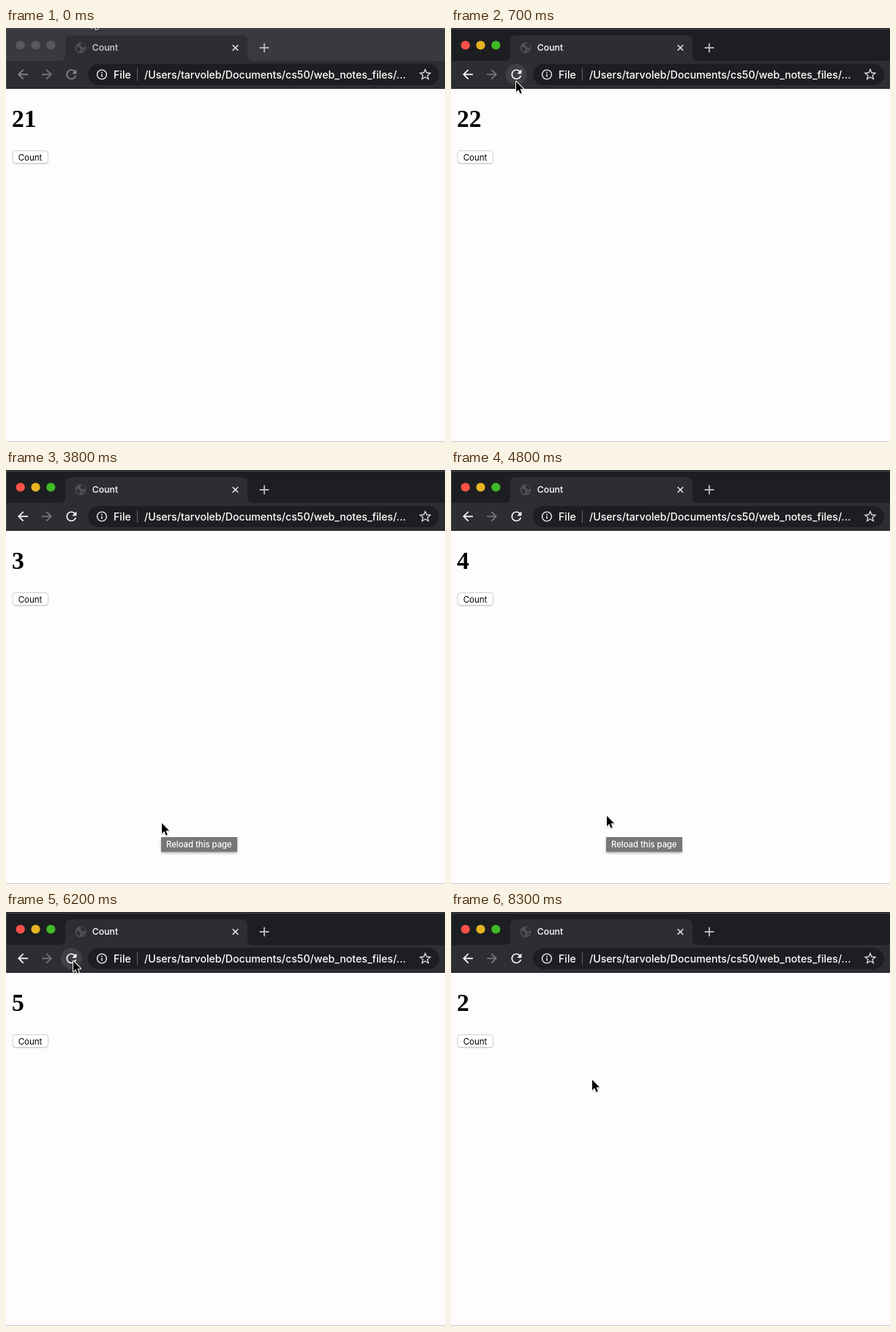
Write an HTML page that moves like this. It is 600 px wide and 565 px high and loops after 8.8 s.

```html
<!DOCTYPE html>
<html lang="en">
<head>
<meta charset="utf-8">
<title>Count</title>
<style>
  html, body { margin: 0; width: 100%; height: 100%; overflow: hidden; background: #fefcff; }
  svg { display: block; width: 600px; height: 565px; }
  text { font-family: Inter, "Open Sans", sans-serif; white-space: pre; }
  .h1 { font: bold 33.6px "Liberation Serif", "Times New Roman", serif; }
  .frame { fill: #1d1e21; }
  .toolbar { fill: #2d2e32; }
  .icon, .tab { fill: #fff; }
  .inactive .frame { fill: #393a3e; }
  .inactive .icon { fill: #898a8d; }
  .inactive .tab { fill: #d2d2d4; }
  .inactive .light { fill: #58595d; }
</style>
</head>
<body>
<svg viewBox="0 0 600 565">
  <defs>
    <path id="arrow" d="M20 11H7.83l5.59-5.59L12 4l-8 8 8 8 1.41-1.41L7.83 13H20z"/>
    <filter id="soft" x="-10%" y="-30%" width="120%" height="170%">
      <feDropShadow dx="0" dy="2" stdDeviation="1.5" flood-opacity=".3"/>
    </filter>
    <filter id="lift" x="-30%" y="-20%" width="170%" height="150%">
      <feDropShadow dx="0" dy=".8" stdDeviation=".7" flood-opacity=".35"/>
    </filter>
  </defs>

  <g id="chrome">
    <rect class="frame" width="600" height="46"/>
    <path d="M0 1.5H600" stroke="#4b4c50"/>
    <path class="toolbar" d="M0 45H73Q81 45 81 37V18Q81 10 89 10H322Q330 10 330 18V37Q330 45 338 45H600V83H0Z"/>
    <path d="M0 82.5H600" stroke="#18191b"/>
    <path d="M.5 2V83" stroke="#55565a" stroke-opacity=".7"/>
    <circle class="light" cx="19.7" cy="23.5" r="6.1" fill="#fd5148"/>
    <circle class="light" cx="40.5" cy="23.5" r="6.1" fill="#e6b423"/>
    <circle class="light" cx="61.3" cy="23.5" r="6.1" fill="#40ba27"/>

    <circle cx="102" cy="27" r="7.4" fill="#505155"/>
    <path d="M96.3 25.5l4 1.2 1.6 3-1.8 3.2q-4-2-3.8-7.4zM101.5 21l3.5-.4q3 2 3.3 5l-3 1.4-3-2.2zM104.6 29.5l2.6-.5-2.6 4z" fill="#2d2e32"/>
    <text class="tab" x="117.7" y="31.2" font-size="12.3" font-weight="500">Count</text>
    <path d="M309.7 23.2l7.6 7.6m0-7.6l-7.6 7.6" stroke="#e4e4e6" stroke-width="1.6"/>
    <path d="M346.7 27h12.6M353 20.7v12.6" stroke="#b4b5b8" stroke-width="1.9"/>

    <use href="#arrow" class="icon" transform="translate(12.6 52.9) scale(.87)"/>
    <use href="#arrow" fill="#77787c" transform="translate(66.4 73.8) scale(-.87)"/>
    <circle id="hover" cx="89.3" cy="63.5" r="14.6" fill="#3f4044"/>
    <path class="icon" transform="translate(79 52.9) scale(.87)" d="M17.65 6.35A7.96 7.96 0 0 0 12 4c-4.42 0-8 3.58-8 8s3.58 8 8 8c3.73 0 6.84-2.55 7.73-6h-2.08A6 6 0 1 1 12 6c1.66 0 3.14.69 4.22 1.78L13 11h7V4z"/>

    <rect x="112" y="49" width="480" height="29" rx="14.5" fill="#1d1e21"/>
    <circle cx="131" cy="63.5" r="6.4" fill="none" stroke="#f0f0f2" stroke-width="1.4"/>
    <path d="M131 62.7v4M131 59.8v1.6" stroke="#f0f0f2" stroke-width="1.5"/>
    <g font-size="14.15" font-weight="500" fill="#fff">
      <text x="147" y="68.5">File</text>
      <text x="189" y="68.5">/Users/tarvoleb/Documents/cs50/web_notes_files/...</text>
    </g>
    <path d="M179.5 55V72" stroke="#66676b"/>
    <path transform="translate(564.7 55.1) scale(.69)" fill="none" stroke="#d9d9db" stroke-width="2"
      d="M12 17.27L18.18 21l-1.64-7.03L22 9.24l-7.19-.61L12 2 9.19 8.63 2 9.24l5.46 4.73L5.82 21z"/>
  </g>

  <text id="count" class="h1" x="8" y="135"></text>
  <rect x="9" y="168" width="48.5" height="17.6" rx="4" fill="#b9b9bb"/>
  <rect x="9" y="167.5" width="48.5" height="17.2" rx="3.8" fill="#fff" stroke="#cfced1"/>
  <text x="33" y="181" font-size="11.5" text-anchor="middle">Count</text>
  <path d="M0 564.5H600" stroke="#c9c8ca"/>

  <g id="tip">
    <rect x="212" y="501" width="104" height="20" fill="#777679" filter="url(#soft)"/>
    <text x="219" y="515.2" font-size="11.3" font-weight="500" fill="#fff">Reload this page</text>
  </g>
  <path id="cursor" filter="url(#lift)" stroke="#fff" stroke-width="2" stroke-linejoin="round" paint-order="stroke"
    d="M0 0V14.2l3.2-3.1 2.3 5.3 2.3-1-2.3-5.2h4.6z"/>
</svg>
<script>
const LOOP = 8800, STEP = 100;
const el = id => document.getElementById(id);

const ease = p => p * p * (3 - 2 * p);
const mix = (a, b, p) => a + (b - a) * p;
const within = (t, from, to) => t >= from && t < to;
const show = (id, on) => el(id).style.display = on ? "" : "none";

// Pointer glides: start, end, then where it comes to rest
const home = { x: 117.5, y: -14.5 };
const glides = [
  { from: 0, to: 600, x: 89, y: 73 },
  { from: 1700, to: 2000, x: 213, y: 482 },
  { from: 4300, to: 4800, x: 213, y: 472 },
  { from: 4800, to: 5000, x: 166, y: 184 },
  { from: 5200, to: 5400, x: 132, y: 118 },
  { from: 5500, to: 5800, x: 85, y: 72 },
  { from: 5800, to: 6000, x: 80, y: 21 },
  { from: 6000, to: 6200, x: 92, y: 67 },
  { from: 6700, to: 7000, x: 193, y: 229 }
];
const reloads = [800, 6300];

function pointerAt(t) {
  let { x, y } = home;
  for (const g of glides) {
    if (t <= g.from) break;
    const p = ease(Math.min(1, (t - g.from) / (g.to - g.from)));
    x = mix(x, g.x, p);
    y = mix(y, g.y, p);
  }
  return `translate(${x} ${y})`;
}

// One tick per second since the last reload
function countAt(t) {
  const start = reloads.filter(r => r <= t).pop() ?? -20300;
  return Math.floor((t - start) / 1000) + (start < 0 ? 1 : 0);
}

function draw(now) {
  const t = Math.floor(now % LOOP / STEP) * STEP;
  el("cursor").setAttribute("transform", pointerAt(t));
  el("count").textContent = countAt(t);
  el("chrome").classList.toggle("inactive", t < 500);
  show("hover", within(t, 700, 900) || within(t, 6100, 6400));
  show("tip", within(t, 2200, 5900));
}

const begin = performance.now();
function tick() {
  draw(performance.now() - begin);
  requestAnimationFrame(tick);
}
tick();
</script>
</body>
</html>
```
